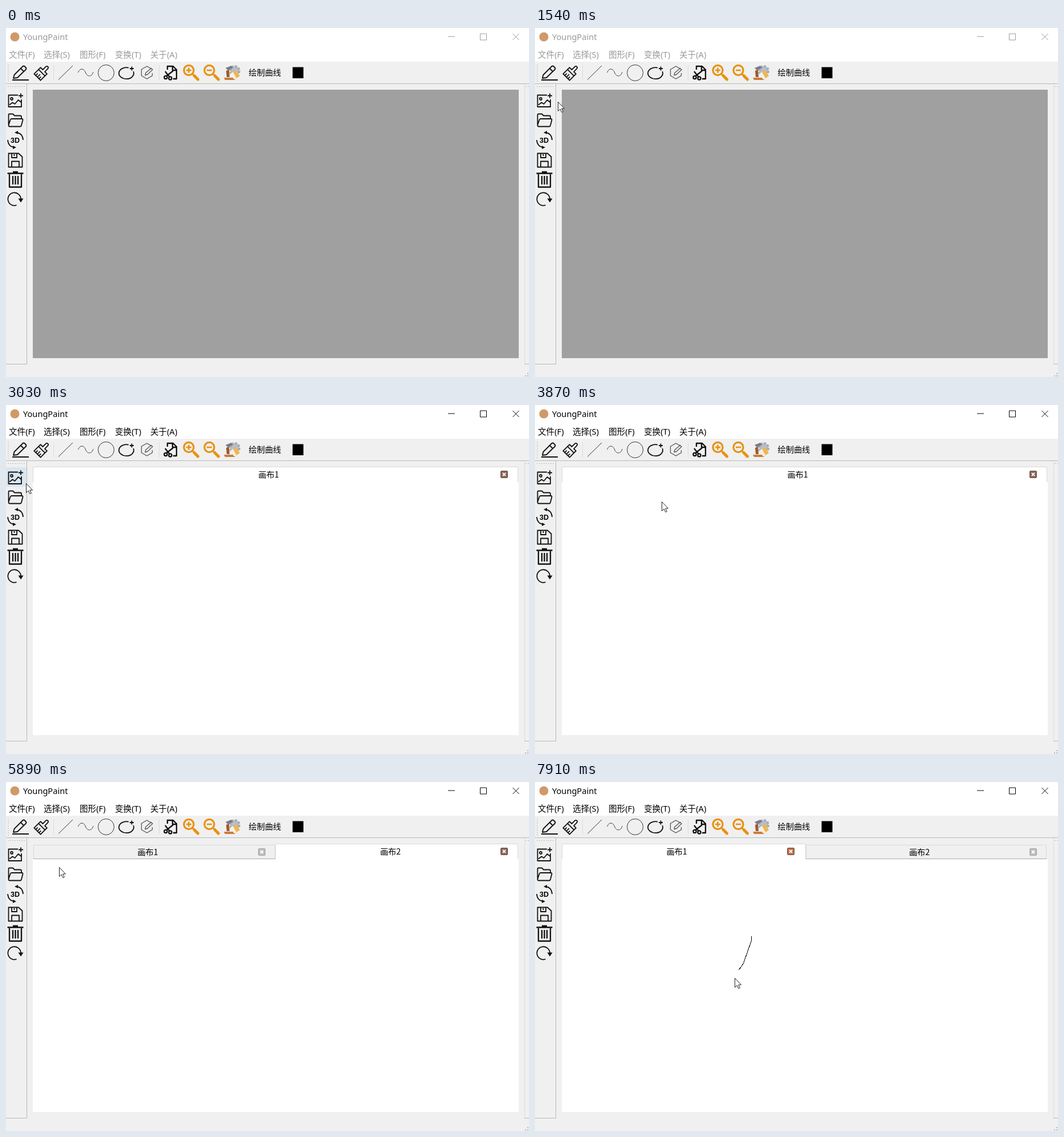
Animation of 917x611 px, one loop 7.99 s. Source, as an HTML page:

```html
<!DOCTYPE html>
<html lang="zh">
<head>
<meta charset="utf-8">
<title>YoungPaint</title>
<style>
  html, body { margin: 0; width: 100%; height: 100%; overflow: hidden; background: #f0f0f0; }
  svg { display: block; width: 917px; height: 611px; }
  text { font: 14.6px "Noto Sans", "Noto Sans CJK SC", "Noto Sans CJK JP", sans-serif; }
  .small { font-size: 14.2px; font-family: "Noto Sans CJK SC", "Noto Sans CJK JP", sans-serif; }
  .mid { text-anchor: middle; }
  .icon { fill: none; stroke: #111; stroke-width: 1.8; stroke-linejoin: round; }
  .thin { stroke: #333; stroke-width: 1; }
  .bold { stroke-width: 2.3; }
  .solid { fill: #111; stroke: none; }
  .frame { color: #999; }
  .frame.on { color: #000; }
  .frame text { fill: currentColor; }
  .frame path { fill: none; stroke: currentColor; }
  .edge { fill: none; stroke: #b8b8b8; }
  .soft { stroke: #dcdcdc; }
  .ink { fill: none; stroke: #000; shape-rendering: crispEdges; }
</style>
</head>
<body>
<svg viewBox="0 0 917 611">
  <clipPath id="drawn"><rect x="47" y="135" width="852" height="0"/></clipPath>
  <rect width="917" height="611" fill="#f0f0f0"/>
  <rect width="917" height="59" fill="#fff"/>

  <circle cx="15.5" cy="15.5" r="8" fill="#cf9a68"/>
  <g class="frame" id="frame">
    <text x="30" y="21">YoungPaint</text>
    <text x="5" y="52">文件(F)</text>
    <text x="66" y="52">选择(S)</text>
    <text x="129" y="52">图形(F)</text>
    <text x="191" y="52">变换(T)</text>
    <text x="253" y="52">关于(A)</text>
    <path d="M775 15h12M831.5 10h11v11h-11zM888.5 10l11 11m0-11l-11 11"/>
  </g>

  <!-- panel edges, grips and separators -->
  <path class="edge" d="M0 97.5H917M36.5 98V588.5H0M909 588.5h8"/>
  <path class="edge soft" d="M909.5 98V588M83.5 65v27M268.5 65v27"/>
  <path class="edge" stroke-dasharray="2 2" d="M4 64v31M3 102.5h32M911 102.5h6"/>
  <path class="edge" stroke-width="2" stroke-dasharray="2 2" d="M910 609h6M914 605h2"/>

  <!-- top toolbar -->
  <g class="icon">
    <path d="M11 91H40M13 88l1.5-6L29 67.5q2-2 4 0l1.5 1.5q2 2 0 4L20 87zM26 71l5 5"/>
    <path transform="translate(62 79) rotate(45)" d="M-2.5-6v-7q0-3 2.500-3t2.500 3v7H8v5H-8v-5zM-8-1V10H8V-1M-4 10V5M0 10V3M4 10V5"/>
    <path class="thin" d="M92 90.500L117 66"/>
    <path class="thin" d="M126.500 78c3-8 10-8 13 0s11 8 13.500-1"/>
    <circle class="thin" cx="175.500" cy="78.500" r="14"/>
    <path d="M215 69.700A13 10 0 1 0 223.300 76M220.500 67.500v7M217 71h7"/>
    <path stroke="#555" stroke-width="1.300" d="M255 71.500L247 67l-9.500 5.500v11L247 89l9.500-5.500V79M244 82.500l1-4 9.500-8 2.500 2.500-9 8.500z"/>
    <path class="bold" d="M283 73v-6h10l6 6v16h-6M292 67v7h7M281.500 84L293 75M287 86l-8-10"/>
    <circle class="bold" cx="280" cy="86.500" r="2.600"/>
    <circle class="bold" cx="288" cy="88" r="2.600"/>
  </g>
  <g fill="none" stroke="#e8920f" stroke-width="2.600">
    <g id="lens">
      <circle cx="320.500" cy="74" r="8.600" stroke-width="3.200"/>
      <path d="M327 80.500l3 3"/>
      <path d="M330 83.500l6.500 6.500" stroke-width="5" stroke-linecap="round"/>
      <path d="M316 74h9"/>
    </g>
    <use href="#lens" x="36"/>
    <path d="M320.500 69.500v9"/>
  </g>
  <g>
    <circle cx="401" cy="75" r="8" fill="#b9bec6" stroke="#a5abb5" stroke-width="4" stroke-dasharray="4 2.300"/>
    <path d="M385 70l10-4 3 4-9 4z" fill="#777d88"/>
    <path d="M386 75l5-2 1 13h-5z" fill="#a1582b"/>
    <path d="M382 87h16l4 4h-18z" fill="#c97c3c"/>
    <path d="M395 79l9-5 6 10-9 6z" fill="#efb650"/>
    <path d="M393 80l5-3 6 11-4 2z" fill="#f5f1e7"/>
  </g>
  <text class="small" x="425.500" y="83">绘制曲线</text>
  <rect x="502.500" y="68.500" width="19" height="19.500"/>

  <!-- side toolbar -->
  <rect id="hover" y="109" width="35.500" height="34"/>
  <g class="icon">
    <g id="add">
      <path d="M21 117.500H4.500V138H27V125M26 114.500v8M22 118.500h8M6 134.500l5.500-4 4 2.500 6-7 5 4"/>
      <circle cx="10" cy="124" r="2"/>
    </g>
    <path d="M4.500 170V152q0-1.500 1.500-1.500h6l3 3h10q2 0 2 2v3M4.500 170l3-9q.5-2 2.500-2H28q1.500 0 1.500 2L27 170.500q-.5 2-2 2H6.500q-2 0-2-2.500"/>
    <path d="M18 183q11 1 12 13M15 209q-11-1-12-13"/>
    <path class="solid" d="M15 183l6-3v6zM18 209l-6-3v6z"/>
    <path d="M4.500 219.500H22l6.500 6V243.500h-24zM10 220v7h9v-7M10 243v-9.500h13V243M14.500 221v3"/>
    <path class="bold" d="M2.500 254.500H30.500M12 252h9M6 256v22.500H27V256M12 259v15M16.500 259v15M21 259v15"/>
    <path d="M18.500 310.200A11.300 11.300 0 1 1 26 299.500"/>
    <path class="solid" d="M21.500 298.500h9L26 305.500z"/>
  </g>
  <text class="mid" x="16" y="200.500" style="font:bold 12.500px Liberation Sans,sans-serif">3D</text>

  <!-- drawing area -->
  <rect id="empty" x="47" y="108" width="852" height="470" fill="#a0a0a0"/>
  <g id="pages">
    <rect x="47" y="135" width="852" height="443" fill="#fff"/>
    <g id="tabs"></g>
    <g clip-path="url(#drawn)">
      <path class="ink" id="ink0" d="M379 270v9l-13 37q-3 7-9 13"/>
      <path class="ink" id="ink1" d="M156.500 229l8 9.500L262 324q17 14 34 24l6 7q18 13 28 17"/>
    </g>
  </g>

  <path id="cursor" d="M.5.500V16.500l3.700-3.500 2.700 5.600 2.400-1.100L6.700 12h4.800z" fill="#fff" stroke="#222"/>
</svg>
<script>
const LOOP = 7990, START = 530, TICK = 77.5;
const $ = id => document.getElementById(id);
const show = (el, on) => el.setAttribute('display', on ? 'inline' : 'none');
const set = (el, attrs) => { for (const k in attrs) el.setAttribute(k, attrs[k]); };

// turning points of the pointer: [tick, x, y]
const turns = [
  [0, 651, 473], [10, 63, 127], [15, 24, 131], [29, 23, 130], [31, 26, 135],
  [40, 320, 189], [49, 27, 130], [65, 25, 131], [69, 93, 149], [72, 156, 229],
  [80, 330, 372], [82, 328, 158], [85, 312, 124], [89, 312, 124],
  [92, 381, 264], [95, 350, 343]
];
// each page's stroke follows the pointer between two ticks
const strokes = [{ from: 92, to: 95 }, { from: 72, to: 80 }];

// a slow start on the long way out of the side bar, straight runs elsewhere
const ease = (f, from) => from === 31 ? f ** 1.6 : f;

function pointer(n) {
  const i = turns.findIndex(p => p[0] > n);
  if (i < 1) return turns.at(i).slice(1);
  const [a, ax, ay] = turns[i - 1], [b, bx, by] = turns[i];
  const f = ease((n - a) / (b - a), a);
  return [ax + (bx - ax) * f, ay + (by - ay) * f];
}

function makeTab(name) {
  const g = document.createElementNS('http://www.w3.org/2000/svg', 'g');
  g.innerHTML = `<rect/><path fill="none" stroke="#d9d9d9"/><path stroke="#aaa"/>
    <text class="small mid">${name}</text>
    <g><rect x="-6" y="-6" width="12" height="12" rx="1.5"/>
    <path d="M-2.5-2.5l5 5m0-5l-5 5" stroke="#fff" stroke-width="1.8"/></g>`;
  $('tabs').append(g);
  const [back, border, base, label, close] = g.children;
  return (left, right, textX, closeX, active, hot, tint) => {
    const drop = active ? 0 : 1, top = 108 + 2 * drop;
    set(back, { x: left, y: top, width: right - left, height: 135 - top,
      fill: active ? '#fff' : hot ? '#d8eaf9' : '#f0f0f0' });
    set(border, { d: `M${left + .5} 135V${top + .5}H${right - .5}V135` });
    set(base, { d: `M${left} 134.5H${right}` });
    show(base, !active);
    set(label, { x: textX, y: 126.5 + drop });
    set(close, { transform: `translate(${closeX} ${121.5 + drop})` });
    set(close.firstElementChild, active
      ? { fill: tint, stroke: '#6f4e44' } : { fill: '#bbb', stroke: '#a8a8a8' });
  };
}
const tabs = [makeTab('画布1'), makeTab('画布2')];

function drawTabs(two, active, hot) {
  const split = active ? 472 : 475, brown = '#8a675a';
  show($('tabs').children[1], two);
  if (!two) return tabs[0](47, 898, 460.5, 873.5, true, false, brown);
  tabs[0](47 + active, split, 248.5, 448.5, !active, hot, '#bd6c49');
  tabs[1](split, 897 + active, 674, 873.5, !!active, false, brown);
}

function render(t) {
  const n = Math.floor((t - START) / TICK);
  const [x, y] = pointer(n).map(Math.round);
  show($('cursor'), n >= 0);
  set($('cursor'), { transform: `translate(${x} ${y})` });
  $('frame').classList.toggle('on', n >= 20);

  const open = n >= 32, two = t >= 5310, active = two && n < 86 ? 1 : 0;
  const down = n >= 20 && !open || n >= 55 && !two;
  show($('hover'), n >= 0 && x < 36 && y > 108 && y < 143);
  set($('hover'), { fill: down ? '#bcdcf4' : '#d8e6f0' });
  set($('add'), { transform: down ? 'translate(1 1)' : '' });

  show($('empty'), !open);
  show($('pages'), open);
  drawTabs(two, active, x > 47 && x < 472 && y > 108 && y < 135);

  const { from, to } = strokes[active];
  show($('ink0'), !active && n >= from);
  show($('ink1'), active && n >= from);
  // the ink trails the pointer by half a tick
  const [, inkY] = pointer(Math.min(n - .5, to));
  set($('drawn').firstElementChild, { height: Math.max(0, inkY - 134) });
}

const begin = performance.now();
function loop() {
  render((performance.now() - begin) % LOOP);
  requestAnimationFrame(loop);
}
loop();
</script>
</body>
</html>
```
